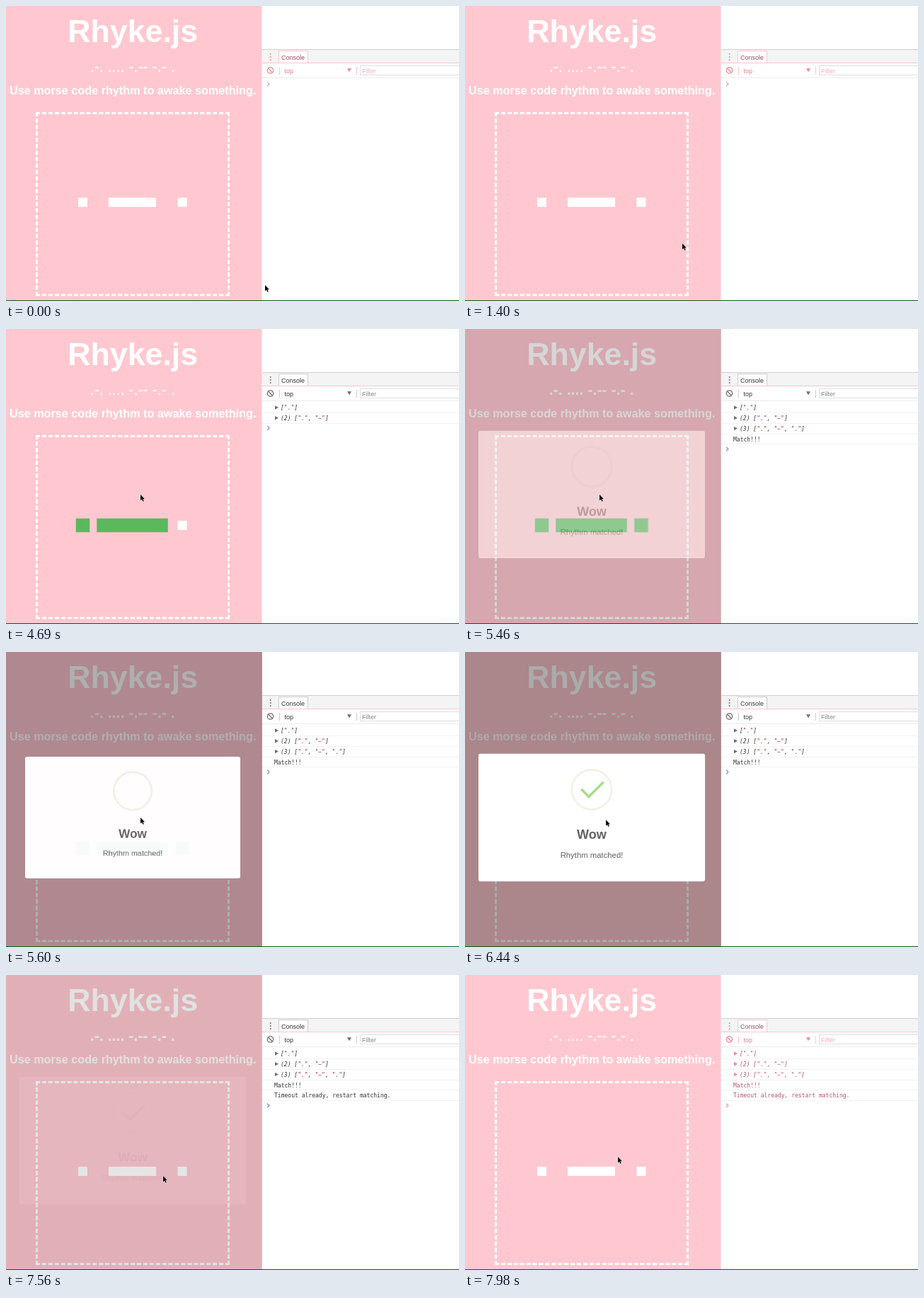
Animation of 640 by 417 pixels, one loop 8000 ms. Source, as an HTML page:

```html
<!DOCTYPE html>
<html lang="en">
<head>
<meta charset="utf-8">
<title>Rhyke.js</title>
<style>
  html, body { margin: 0; width: 100%; height: 100%; overflow: hidden; background: #fff; }
  #stage { position: relative; width: 640px; height: 417px; overflow: hidden; font-family: "Liberation Sans", Arial, sans-serif; }
  #stage > * { position: absolute; }
  #scene { left: 0; top: 0; }
  #scene .head { fill: #fff; font-weight: 700; text-anchor: middle; }
  .block { fill: #fff; transform-box: fill-box; transform-origin: center; }
  #frame { box-sizing: border-box; left: 42px; top: 150px; width: 274px; height: 260px; border: 3px dashed #fff; }

  #console { font-size: 9px; }
  .mono { font: 8.04px "DejaVu Sans Mono", Menlo, monospace; fill: var(--ink); }
  .mono .list { font-style: italic; }
  .mono .str { fill: var(--str); }

  #overlay { left: 0; top: 0; width: 361.5px; height: 416px; background: rgba(0, 0, 0, .33); opacity: 0; }
  #modal { position: absolute; left: -60px; top: 98.5px; width: 478px; height: 270px; border-radius: 5px; background: #fff; text-align: center; }
  #modal > * { position: absolute; }
  #modal p { left: 0; width: 100%; margin: 0; line-height: 30px; color: rgba(0, 0, 0, .62); }
  #wow { top: 156px; font-size: 27px; font-weight: 700; }
  #note { top: 199.5px; font-size: 16.9px; }
  #icon { left: 195px; top: 32px; width: 80px; height: 80px; border: 4px solid #f1f2e6; border-radius: 50%; }
  #icon i { position: absolute; height: 5px; border-radius: 2px; background: #a5dc86; }
  #tip { transform: rotate(45deg); }
  #long { transform: rotate(-45deg); }
  #cursor { left: 0; top: 0; overflow: visible; }
</style>
</head>
<body>
<div id="stage">
  <svg id="scene" width="640" height="417">
    <rect width="361.5" height="417" fill="#ffc8d0"/>
    <text class="head" x="179.2" y="51" font-size="44.7">Rhyke.js</text>
    <text class="head" id="morse" x="178.7" y="93.4" font-size="21.4">.-. .... -.-- -.- .</text>
    <text class="head" x="179.2" y="125" font-size="16.22">Use morse code rhythm to awake something.</text>
    <rect class="block" x="102" y="271" width="13" height="13"/>
    <rect class="block" x="145" y="271" width="67" height="13"/>
    <rect class="block" x="242.5" y="271" width="13" height="13"/>

    <g id="console">
      <rect x="362" y="62" width="278" height="19" fill="#f4f4f4"/>
      <path d="M362 61.5H640" stroke="#cfcfcf"/>
      <path d="M362 80.5H640" stroke="#ffc4cc"/>
      <path d="M362 101.5H640" stroke="#ebebeb"/>
      <path d="M385.5 80V63.5H426.5V80" fill="#fff" style="stroke:var(--line)"/>
      <g style="fill:var(--icon)">
        <circle cx="373.7" cy="68" r="1"/><circle cx="373.7" cy="72" r="1"/><circle cx="373.7" cy="76" r="1"/>
        <path d="M482 88.3H488L485 93.3Z"/>
      </g>
      <path d="M369.3 91a4.2 4.2 0 1 0 8.4 0a4.2 4.2 0 1 0-8.4 0M370.6 88L376.4 94" fill="none" stroke-width="1.3" style="stroke:var(--icon)"/>
      <path d="M386.5 86V97M495.5 86V97" style="stroke:var(--line)"/>
      <path d="M642 84.5H500.5V97.5H642" fill="none" stroke="#dedede"/>
      <text x="389" y="76" style="fill:var(--tab)">Console</text>
      <text x="393.5" y="94.5" style="fill:var(--top)">top</text>
      <text x="503" y="94.5" style="fill:var(--hint)">Filter</text>
      <g id="rows"></g>
      <path id="prompt" d="M369 107.7L372 110.5L369 113.3" fill="none" stroke-width="1.3" style="stroke:var(--prompt)"/>
    </g>
    <rect y="416" width="640" height="1" fill="#0b5a1e"/>
  </svg>

  <div id="frame"></div>

  <div id="overlay">
    <div id="modal">
      <div id="icon"><i id="tip"></i><i id="long"></i></div>
      <p id="wow">Wow</p>
      <p id="note">Rhythm matched!</p>
    </div>
  </div>

  <svg id="cursor" width="8" height="12">
    <path d="M0 0V8.4L2 6.7L3.4 9.8L4.8 9.2L3.4 6.3H6Z" stroke="#fff" stroke-width=".9" paint-order="stroke"/>
  </svg>
</div>

<script>
const LOOP = 8000, OPEN = 5375, CLOSE = 7450, TINT_END = 2940, TINT_BACK = CLOSE + 300;
const $ = id => document.getElementById(id);

// Steps are [ms, properties, easing towards the next step]; without easing the value holds.
function play(el, steps) {
  const frames = steps.map(([t, props, easing = 'step-end']) => ({ offset: t / LOOP, easing, ...props }));
  frames.push({ ...frames.at(-1), offset: 1 });
  el.animate(frames, { duration: LOOP, iterations: Infinity });
}

// Console log
const str = s => `<tspan class="str">"${s}"</tspan>`;
const list = (head, ...items) => `<tspan class="list" x="388">${head}[${items.map(str).join(', ')}]</tspan>`;
const line = s => `<tspan x="379">${s}</tspan>`;
const logs = [
  [2800, list('', '.')],
  [4130, list('(2) ', '.', '−')],
  [5110, list('(3) ', '.', '−', '.')],
  [5350, line('Match!!!')],
  [7420, line('Timeout already, restart matching.')]
];
$('rows').innerHTML = logs.map(([, text], i) => {
  const y = 111 + i * 14.8;
  const arrow = i < 3 ? `<path d="M380 ${y - 2.7}L385 ${y}L380 ${y + 2.7}Z" style="fill:var(--icon)"/>` : '';
  return `<g>${arrow}<text class="mono" y="${y + 3.2}">${text}</text>
    <path d="M362 ${Math.round(y + 7) + .5}H640" stroke="#f2f2f2"/></g>`;
}).join('');
[...$('rows').children].forEach((row, i) => play(row, [[0, { opacity: 0 }], [logs[i][0], { opacity: 1 }]]));
play($('prompt'), [[0, { transform: 'none' }],
  ...logs.map(([t], i) => [t, { transform: `translateY(${(i + 1) * 14.8}px)` }])]);

// The console is tinted pink while only pink and white are on screen
const names = ['ink', 'str', 'icon', 'tab', 'top', 'hint', 'prompt', 'line'];
const palette = (...colors) => Object.fromEntries(names.map((n, i) => ['--' + n, colors[i]]));
const tinted = palette('#b8526a', '#c8506a', '#e8899a', '#95505e', '#f0788c', '#ffabb8', '#d9a3ad', '#ffc4cc');
const plain = palette('#303030', '#a8283c', '#6e6e6e', '#333', '#333', '#858585', '#7d8fdc', '#ccc');
play($('console'), [[0, tinted], [TINT_END, plain], [TINT_BACK, tinted]]);
play($('morse'), [[0, { fontWeight: 400 }], [OPEN, { fontWeight: 700 }], [TINT_BACK, { fontWeight: 400 }]]);

// Rhythm blocks
const block = (fill, size, opacity = 1) => ({ fill, opacity, transform: `scale(${size})` });
const WHITE = '#fff', GREEN = '#5ab95c';
document.querySelectorAll('.block').forEach((el, i) => {
  const hit = logs[i][0];
  play(el, [
    [0, block(WHITE, 1)],
    [hit, block(GREEN, 1, 0)],
    [hit + 140, block(GREEN, 1.25), 'ease-out'],
    [hit + 290, block(GREEN, 1.5)],
    [7250, block(WHITE, 1)]
  ]);
});

// Dialog
const fade = (el, ms) => play(el, [
  [0, { opacity: 0 }], [OPEN, { opacity: 0 }, 'ease'], [OPEN + ms, { opacity: 1 }],
  [CLOSE, { opacity: 1 }, 'ease'], [CLOSE + ms, { opacity: 0 }]
]);
fade($('overlay'), 300);
fade($('modal'), 200);
const zoom = k => ({ transform: `scale(${.67 * k})` });
play($('modal'), [
  [0, zoom(1)], [OPEN, zoom(.5), 'ease'], [OPEN + 135, zoom(1.05), 'ease'],
  [OPEN + 240, zoom(.95), 'ease'], [OPEN + 300, zoom(1)]
]);

const px = o => Object.fromEntries(Object.entries(o).map(([k, v]) => [k, v + 'px']));
const tip = (width, left, top) => px({ width, left, top });
const long = (width, right, top) => px({ width, right, top });
play($('tip'), [
  [0, tip(0, 1, 19)], [OPEN + 405, tip(0, 1, 19), 'ease'], [OPEN + 525, tip(50, -8, 37), 'ease'],
  [OPEN + 630, tip(17, 21, 48), 'ease'], [OPEN + 750, tip(25, 14, 45)]
]);
play($('long'), [
  [0, long(0, 46, 54)], [OPEN + 488, long(0, 46, 54), 'ease'],
  [OPEN + 630, long(55, 0, 35), 'ease'], [OPEN + 750, long(47, 8, 38)]
]);

// Pointer
const at = (x, y) => ({ transform: `translate(${x}px, ${y}px)` });
play($('cursor'), [
  [0, at(366, 394.5)], [900, at(366, 394.5), 'ease-in-out'], [2100, at(202, 231)],
  [2950, at(202, 231), 'ease-in-out'], [3400, at(190, 234)],
  [6300, at(190, 234), 'linear'], [6440, at(199, 237), 'ease-out'], [6790, at(222, 284)],
  [7600, at(222, 284), 'ease-in-out'], [7950, at(216, 257)]
]);
</script>
</body>
</html>
```
